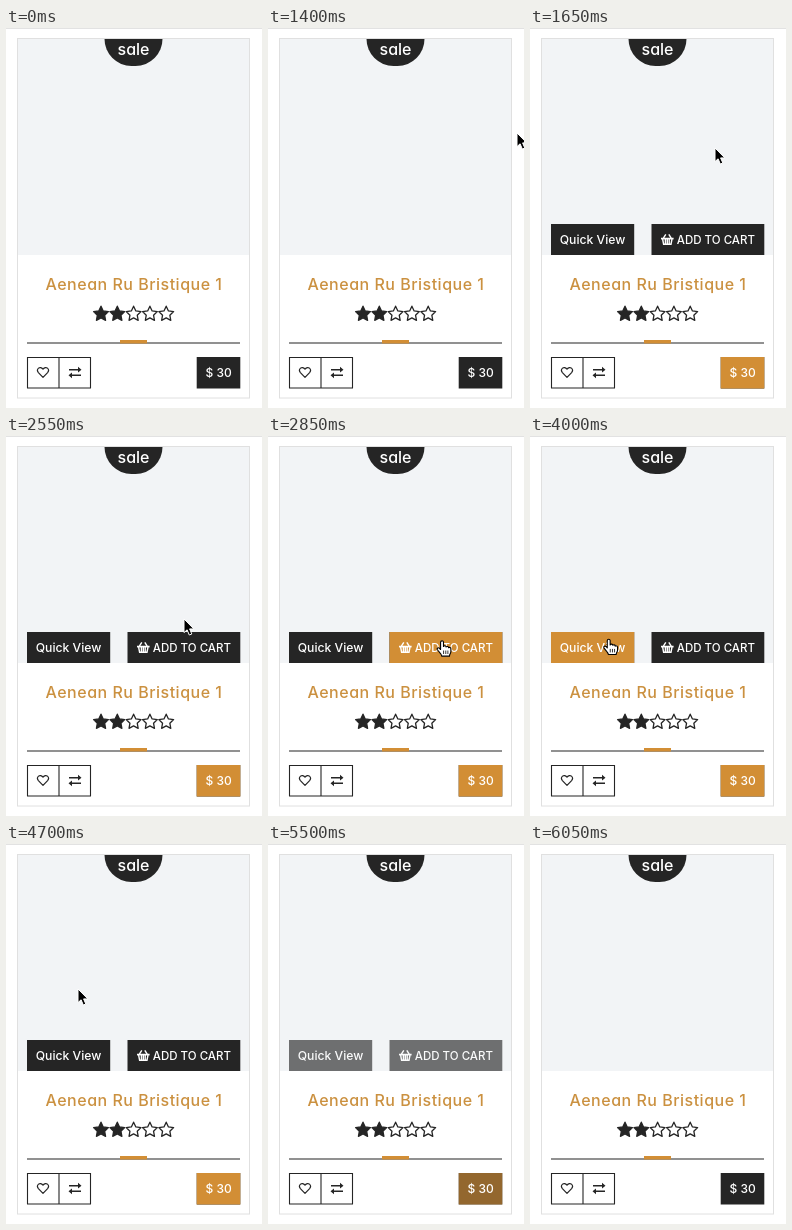
An HTML page that plays this animation: 256x380 px, repeating every 6400 ms.

```html
<!DOCTYPE html>
<html lang="en">
<head>
<meta charset="utf-8">
<title>Product card</title>
<style>
  html, body { margin: 0; width: 100%; height: 100%; overflow: hidden; background: #fff; }
  svg { display: block; width: 256px; height: 380px; }
  text { font: 500 12px Inter, "Open Sans", sans-serif; font-feature-settings: "cv11"; fill: #fff; }
  .dark { fill: #252525; }
  .gold { fill: #d28e35; }
  .line { fill: none; stroke: #252525; }
</style>
</head>
<body>
<svg viewBox="0 0 256 380">
  <rect width="256" height="380" fill="#fff"/>
  <path d="M0 .5H256" stroke="#e2e2e2"/>
  <rect x="11.5" y="10.5" width="232" height="359.5" fill="#fff" stroke="#e0e0e0"/>
  <rect x="12" y="11" width="231" height="216" fill="#f2f4f6"/>

  <path class="dark" d="M98.5 11H156.5A27 27 0 0 1 129.5 38H125.5A27 27 0 0 1 98.5 11Z"/>
  <text x="127.5" y="27" text-anchor="middle" style="font-size:16px">sale</text>

  <text x="39.5" y="262" class="gold" style="font-size:16px;letter-spacing:.5px;fill:#cb9140">Aenean Ru Bristique 1</text>
  <g id="stars" stroke="#252525" stroke-width="1.3" stroke-linejoin="round"></g>

  <path d="M21 315H234" stroke="#252525" stroke-width="1.2"/>
  <rect class="gold" x="114" y="312" width="27" height="3.5"/>

  <path class="line" d="M21.5 329.5H84.5V360H21.5ZM53 329.5V360" stroke-width="1.1"/>
  <path class="line" stroke-width="1.2" stroke-linejoin="round"
    d="M37 349.3L32.4 344.6C29.7 341.3 34 337.2 37 341.2C40 337.2 44.3 341.3 41.6 344.6Z"/>
  <path class="line" stroke-width="1.5" d="M63 341.7H73M75 347.3H65"/>
  <path class="dark" d="M72 338.8L75.5 341.7L72 344.6ZM66 344.4L62.5 347.3L66 350.2Z"/>

  <rect class="dark" x="190.7" y="329" width="43.6" height="31.5"/>
  <rect class="gold" id="price" x="190.7" y="329" width="43.6" height="31.5"/>
  <text x="199.5" y="349">$ 30</text>

  <g id="actions">
    <rect class="dark" x="21" y="196" width="83.2" height="31"/>
    <rect class="gold" id="view" x="21" y="196" width="83.2" height="31"/>
    <text x="29.7" y="216" style="font-size:12.2px">Quick View</text>
    <rect class="dark" x="121.5" y="196" width="112.8" height="31"/>
    <rect class="gold" id="add" x="121.5" y="196" width="112.8" height="31"/>
    <g fill="none" stroke="#fff">
      <path stroke-width="1.4" d="M133.4 210.2L135.8 206.3M141.2 210.2L138.8 206.3"/>
      <path stroke-width="1.7" d="M131 210.6H143.6"/>
      <path stroke-width="1.4" d="M132.6 211L133.6 216.2H141L142 211M135.4 211V216M137.3 211V216M139.2 211V216"/>
    </g>
    <text x="146.8" y="216" style="font-size:11.5px">ADD TO CART</text>
  </g>

  <g id="cursor" stroke-linejoin="round">
    <path id="arrow" fill="#000" stroke="#fff" stroke-width="1"
      d="M0 0V13.6L3.1 10.8L5.3 16L7.8 15L5.6 9.9H9.8Z"/>
    <g id="hand" stroke="#000" stroke-width="1.1">
      <path fill="#fff" d="M-1.5 8V.8C-1.5 -1.2 1.4 -1.2 1.4 .8V5C2 3.8 4 4 4 5.4C4.8 4.5 6.4 4.9 6.5 6.2C7.5 5.5 8.8 6 8.8 7.5V10C8.8 12 7.4 12.6 7.4 14.6H-.4C-.7 12 -3 10.8 -4.7 8.2C-5.6 6.6 -3.6 5.5 -2.5 6.8Z"/>
      <path fill="none" stroke-width=".8" d="M1.5 9V12.5M3.7 9V12.5M5.8 9V12.5"/>
    </g>
  </g>
</svg>
<script>
const LOOP = 6400, STEP = 50, FADE = 250;
const el = id => document.getElementById(id);
const clamp = v => Math.min(1, Math.max(0, v));
const easeOut = p => 1 - (1 - p) ** 2;
const easeInOut = p => p * p * (3 - 2 * p);
const linear = p => p;

// Each stop: time, x, y and the easing used to arrive there.
const path = [
  [1400, 249, 105, linear],
  [1650, 185, 120, easeOut],
  [2250, 185, 120, linear],
  [2550, 178, 183, easeInOut],
  [2900, 174, 206, easeOut],
  [3200, 174, 206, linear],
  [3400, 130, 205, easeInOut],
  [3700, 79, 206, easeOut],
  [3950, 79, 206, linear],
  [4400, 72, 145, easeInOut],
  [5150, 72, 145, linear],
  [5450, 2, 135, easeInOut]
];

function starPoints(cx, cy, outer) {
  return Array.from({ length: 10 }, (_, i) => {
    const r = i % 2 ? outer * 0.49 : outer;
    const a = i * Math.PI / 5 - Math.PI / 2;
    return `${cx + r * Math.cos(a)},${cy + r * Math.sin(a)}`;
  }).join(" ");
}

el("stars").innerHTML = Array.from({ length: 5 }, (_, i) =>
  `<polygon points="${starPoints(95 + i * 16.3, 286, 7.8)}" fill="${i < 2 ? "#252525" : "none"}"/>`
).join("");

function cursorAt(t) {
  const next = path.findIndex(stop => stop[0] >= t);
  if (next <= 0) return path[0].slice(1, 3);
  const [t0, x0, y0] = path[next - 1];
  const [t1, x1, y1, ease] = path[next];
  const p = ease((t - t0) / (t1 - t0));
  return [x0 + (x1 - x0) * p, y0 + (y1 - y0) * p];
}

// Hover strength: fades in after `enter`, fades out after `leave`.
const hover = (t, enter, leave) =>
  easeOut(clamp((t - enter) / FADE)) * (1 - easeOut(clamp((t - leave) / FADE)));

const show = (id, opacity) => el(id).setAttribute("opacity", opacity);

function draw(now) {
  const t = Math.floor(now % LOOP / STEP) * STEP;
  const card = hover(t, 1400, 5450);
  show("price", card);
  show("actions", card);
  show("add", hover(t, 2600, 3420));
  show("view", hover(t, 3450, 4080));

  const visible = t >= 1400 && t <= 5450;
  const pointing = t >= 2650 && t < 4150;
  show("cursor", visible ? 1 : 0);
  show("hand", pointing ? 1 : 0);
  show("arrow", pointing ? 0 : 1);
  if (visible) el("cursor").setAttribute("transform", `translate(${cursorAt(t)})`);
}

const start = performance.now();
function tick() {
  draw(performance.now() - start);
  requestAnimationFrame(tick);
}
tick();
</script>
</body>
</html>
```
